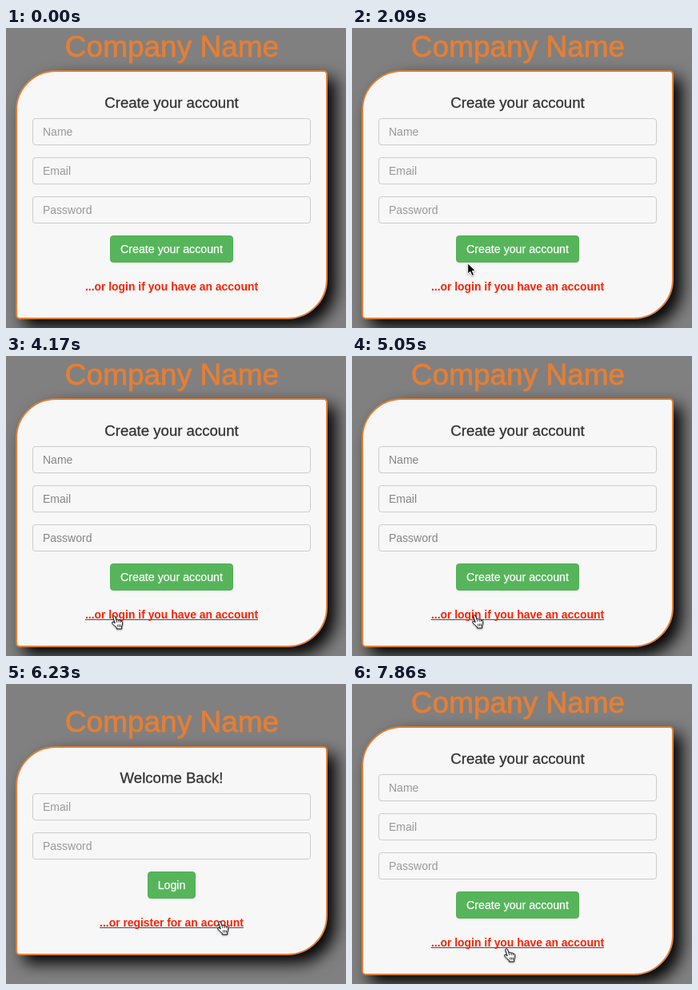
Recreate the animation shown at these times as an HTML page. Size 425 px wide and 376 px high, loop 8000 ms.

```html
<!DOCTYPE html>
<html lang="en">
<head>
<meta charset="utf-8">
<title>Account form</title>
<style>
  html, body { margin: 0; width: 100%; height: 100%; overflow: hidden; }
  body { background: #808080; font: 14px "Liberation Sans", Arial, sans-serif; }
  #stage { position: relative; width: 425px; height: 376px; overflow: hidden; background: #808080; }
  #stage * { position: absolute; box-sizing: border-box; white-space: nowrap; }
  .view { inset: 0; }
  .title, .head, .link { left: 0; width: 414px; text-align: center; }
  .title { top: 4px; width: 415px; font-size: 37px; line-height: 40px; color: #e47f36; -webkit-text-stroke: .8px #e47f36; }
  .panel {
    left: 12px; top: 53px; width: 390px; height: 312px;
    background: #f7f7f7; border: 2px solid #e08038; border-radius: 50px 5px;
    box-shadow: 10px 10px 20px #000;
  }
  .head { top: 84px; font-size: 18.6px; line-height: 20px; color: #333; -webkit-text-stroke: .3px #333; }
  .field {
    left: 33px; width: 348px; height: 34px; padding-left: 12px; line-height: 32px;
    color: #999; border: 1px solid #ccc; border-radius: 4px;
  }
  .dim .field { color: #858585; }
  .button {
    left: 130px; top: 260px; width: 154px; height: 34px; line-height: 32px;
    font-size: 14.2px; text-align: center; color: #fff; -webkit-text-stroke: .25px #fff;
    background: #56b55b; border: 1px solid #50b055; border-radius: 4px;
  }
  .link { top: 314px; font-size: 13.9px; font-weight: bold; line-height: 20px; color: #fb2206; }
  .hover .link { text-decoration: underline #23527c 1px; text-decoration-skip-ink: none; }
  #login .title { top: 28px; }
  #login .panel { top: 78px; height: 262px; }
  #login .head { top: 108px; }
  #login .button { left: 177px; top: 235px; width: 60px; }
  #login .link { top: 289px; }
  .cursor { left: 0; top: 0; overflow: visible; filter: drop-shadow(0 1px 1px rgba(0, 0, 0, .35)); }
</style>
</head>
<body>
<div id="stage">
  <div class="view" id="register">
    <div class="title">Company Name</div>
    <div class="panel"></div>
    <div class="head">Create your account</div>
    <div class="field" style="top:113px">Name</div>
    <div class="field" style="top:162px">Email</div>
    <div class="field" style="top:211px">Password</div>
    <div class="button">Create your account</div>
    <div class="link">...or login if you have an account</div>
  </div>
  <div class="view" id="login">
    <div class="title">Company Name</div>
    <div class="panel"></div>
    <div class="head">Welcome Back!</div>
    <div class="field" style="top:137px">Email</div>
    <div class="field" style="top:186px">Password</div>
    <div class="button">Login</div>
    <div class="link">...or register for an account</div>
  </div>
  <svg class="cursor" id="arrow" width="13" height="19">
    <path d="M.7 .9V14.2L3.8 11.3L6 16.5L8.5 15.4L6.3 10.4H10.4Z" fill="#000" stroke="#fff" stroke-width="1"/>
  </svg>
  <svg class="cursor" id="hand" width="16" height="18">
    <path d="M5.2 9.8L2.9 3Q2.4 1.2 3.6 .8Q4.9 .4 5.5 2L7.1 6.2Q7.4 5.1 8.5 5.2Q9.5 5.3 9.8 6.5Q10.2 5.7 11.2 5.9Q12.1 6.1 12.3 7.2Q12.9 6.6 13.7 7.1Q14.8 7.8 14.8 10Q14.9 12.4 13.7 14.2V17H7.4V15.4Q4.7 13.6 2.8 11.2Q.9 9.5 1.8 8.6Q2.9 7.8 5.2 9.8Z"
      fill="#fff" stroke="#000" stroke-linejoin="round"/>
    <path d="M7.1 6.2L7.9 9M9.8 6.5L10.3 9M12.3 7.2L12.5 9.2M8.7 11.5V14.6M10.6 11.5V14.6M12.4 11.5V14.6" fill="none" stroke="#000" stroke-width=".8"/>
  </svg>
</div>
<script>
  const LOOP = 8000;
  const $ = id => document.getElementById(id);
  const stage = $('stage');

  // time, cursor, x, y, link hovered
  const steps = [
    [0, ''],
    [1500, 'arrow', 197, 366],
    [1650, 'arrow', 198, 356],
    [1800, 'arrow', 197, 345],
    [1940, 'arrow', 195, 335],
    [2090, 'arrow', 144, 294],
    [2240, 'arrow', 104, 289],
    [3580, 'arrow', 90, 291],
    [3720, 'arrow', 91, 296],
    [3870, 'arrow', 96, 307],
    [4020, 'hand', 108, 319, 1],
    [4160, 'hand', 131, 325, 1],
    [4310, 'hand', 149, 325, 1],
    [4600, 'hand', 149, 324, 1],
    [5350, 'hand', 149, 324],
    [5650, 'arrow', 156, 322],
    [5800, 'arrow', 190, 321],
    [5940, 'arrow', 234, 317],
    [6090, 'arrow', 262, 310],
    [6230, 'hand', 263, 297, 1],
    [7130, 'hand', 263, 297],
    [7580, 'arrow', 265, 299],
    [7720, 'arrow', 235, 303],
    [7860, 'hand', 189, 331, 1]
  ];

  const show = (id, on) => { $(id).style.visibility = on ? 'visible' : 'hidden'; };

  function render(t) {
    const [, kind, x = 0, y = 0, hover] = steps.findLast(s => s[0] <= t);
    const login = t >= 5350 && t < 7130;
    show('login', login);
    show('register', !login);
    stage.classList.toggle('hover', !!hover);
    stage.classList.toggle('dim', t >= 2540 && t < 5350);
    for (const id of ['arrow', 'hand']) {
      show(id, id === kind);
      $(id).style.transform = `translate(${x}px, ${y}px)`;
    }
  }

  const start = performance.now();
  function tick() {
    render((performance.now() - start) % LOOP);
    requestAnimationFrame(tick);
  }
  tick();
</script>
</body>
</html>
```
